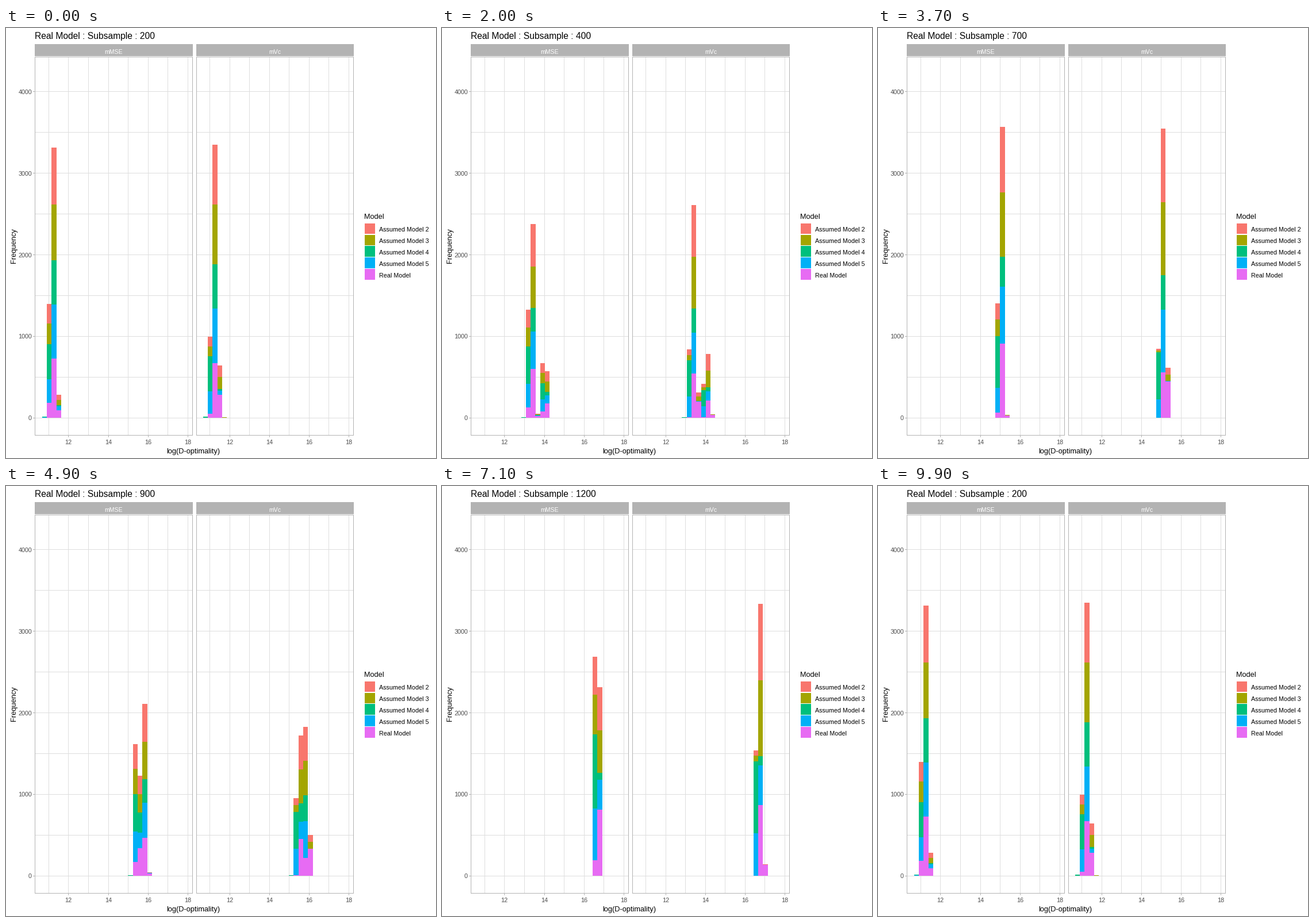
Animation of 748 by 748 pixels, one loop 10000 ms. Source, as a matplotlib script:

```python
import math

import numpy as np
import matplotlib.pyplot as plt
from matplotlib.animation import FuncAnimation
from matplotlib.collections import PolyCollection
from matplotlib.patches import Rectangle

SIZE, DPI = 748, 64
FRAMES, INTERVAL = 100, 100
BINS, DRAWS = 30, 1000
SIZES = list(range(200, 1501, 100))

# Models in stacking order, from the axis upwards.
MODELS = ["Real Model", "Assumed Model 5", "Assumed Model 4",
          "Assumed Model 3", "Assumed Model 2"]
COLORS = ["#E76BF3", "#00B0F6", "#00BF7D", "#A3A500", "#F8766D"]

# Centre of the histograms in bins, at a few sample sizes.
KNOTS = [200, 400, 500, 700, 1000, 1200, 1400, 1500]
CENTRES = [2.30, 11.18, 14.0, 18.24, 22.71, 25.01, 26.95, 27.81]

# Each model's shift from the centre: at 200, and from 700 on.
SHIFTS = {
    "mMSE": [(0.10, 0.20), (-0.05, -0.09), (-0.23, -0.34), (0, 0),
             (0.01, 0.01)],
    "mVc": [(0.44, 0.72), (-0.03, -0.02), (-0.23, -0.30), (0.23, 0.35),
            (0.22, 0.36)],
}
PANEL_DX = {"mMSE": 0, "mVc": 280.15}
BAR_LEFT = {"mMSE": 62.9, "mVc": 342.65}
BAR_WIDTH = 8.3


def normal_cdf(z):
    return 0.5 * (1 + math.erf(z / math.sqrt(2)))


def histogram(panel, n):
    """Counts per bin and model: normal draws that narrow as n grows."""
    centre = np.interp(math.log(n), np.log(KNOTS), CENTRES)
    spread = 0.45 * (n / 200) ** -0.35
    counts = np.zeros((BINS, len(MODELS)))
    for m, ends in enumerate(SHIFTS[panel]):
        mean = centre + np.interp(math.log(n), np.log([200, 700]), ends)
        cdf = [normal_cdf((edge - mean) / spread) for edge in range(BINS + 1)]
        counts[:, m] = np.round(DRAWS * np.diff(cdf))
    return counts


DATA = {p: [histogram(p, n) for n in SIZES] for p in PANEL_DX}

# (first frame, number of steps) of every move to the next state
STEPS = [4] * 3 + [3] * 3 + [2] + [3] * 7
MOVES = []
start = 4
for steps in STEPS:
    MOVES.append((start, steps))
    start += steps + 4

fig = plt.figure(figsize=(SIZE / DPI, SIZE / DPI), dpi=DPI, facecolor="white")
ax = fig.add_axes([0, 0, 1, 1])
ax.set_xlim(0, SIZE)
ax.set_ylim(SIZE, 0)
ax.axis("off")


def box(x0, y0, x1, y1, color, z=1):
    ax.add_patch(Rectangle((x0, y0), x1 - x0, y1 - y0, facecolor=color,
                           linewidth=0, antialiased=False, zorder=z))


def label(x, y, text, px, color="black", ha="left", **kw):
    return ax.text(x, y, text, fontsize=px * 72 / DPI, color=color, ha=ha,
                   va="baseline", family="Liberation Sans", zorder=5, **kw)


def x_pos(value):
    return 108.4 + 34.58 * (value - 12)


def y_pos(count):
    return 678 - 0.142 * count


GRID, BORDER, AXIS = "#DEDEDE", "#B3B3B3", "#4D4D4D"
TOP, BOTTOM = 50, 708


def draw_panel(name, dx):
    left, right = round(50.4 + dx), round(324.2 + dx)
    box(left, 28, right + 1, TOP - 1, BORDER)
    label((left + right) / 2, 45, name, 10.5, "white", "center")
    for value in range(11, 19):
        x = round(x_pos(value) + dx)
        box(x, TOP, x + 1, BOTTOM, GRID)
        if value % 2 == 0:
            box(x, BOTTOM, x + 1, BOTTOM + 4, BORDER)
            label(x + 0.5, 724, str(value), 10.8, AXIS, "center")
    for count in range(0, 4001, 500):
        y = round(y_pos(count))
        box(left, y, right, y + 1, GRID)
    for x in (left, right):
        box(x, TOP, x + 1, BOTTOM + 1, BORDER, 4)
    for y in (TOP, BOTTOM):
        box(left, y, right + 1, y + 1, BORDER, 4)


for name, dx in PANEL_DX.items():
    draw_panel(name, dx)
for count in range(0, 4001, 1000):
    y = round(y_pos(count))
    box(47, y, 50, y + 1, BORDER)
    label(45, y + 4.5, str(count), 10.8, AXIS, "right")

label(326, 740, "log(D-optimality)", 12.8, ha="center")
label(17, 379, "Frequency", 12.9, ha="center", rotation=90,
      rotation_mode="anchor")
label(623, 332, "Model", 12.7)
for i, (name, color) in enumerate(zip(MODELS[::-1], COLORS[::-1])):
    y = 339.6 + 19.9 * i
    box(624, round(y), 642, round(y + 18.6), color)
    label(649, 354 + 20 * i, name, 10.8)

title = label(50, 19, "", 15.6)
bars = PolyCollection([], linewidths=0, edgecolors="none",
                      antialiaseds=False, zorder=3)
ax.add_collection(bars, autolim=False)


def moment(frame):
    """Return the two states being blended and the share of the second."""
    for i in reversed(range(len(MOVES))):
        first, steps = MOVES[i]
        if frame >= first:
            share = min(1, (frame - first + 1) / steps)
            return i, (i + 1) % len(SIZES), share
    return 0, 0, 0


def draw(frame):
    a, b, share = moment(frame)
    polys, colors = [], []
    for name, left in BAR_LEFT.items():
        counts = (1 - share) * DATA[name][a] + share * DATA[name][b]
        tops = np.cumsum(counts, axis=1)
        for k, m in zip(*np.nonzero(counts > 0.01)):
            x0 = left + BAR_WIDTH * k
            x1 = x0 + BAR_WIDTH
            y1 = y_pos(tops[k, m])
            y0 = y_pos(tops[k, m] - counts[k, m])
            polys.append([(x0, y0), (x1, y0), (x1, y1), (x0, y1)])
            colors.append(COLORS[m])
    bars.set_verts(polys)
    bars.set_facecolor(colors)
    nearest = SIZES[b if share >= 0.5 else a]
    title.set_text(f"Real Model : Subsample : {nearest}")
    return bars, title


def reset():
    return draw(0)


anim = FuncAnimation(fig, draw, frames=FRAMES, init_func=reset,
                     interval=INTERVAL, repeat=True, repeat_delay=0)
plt.show()
```
